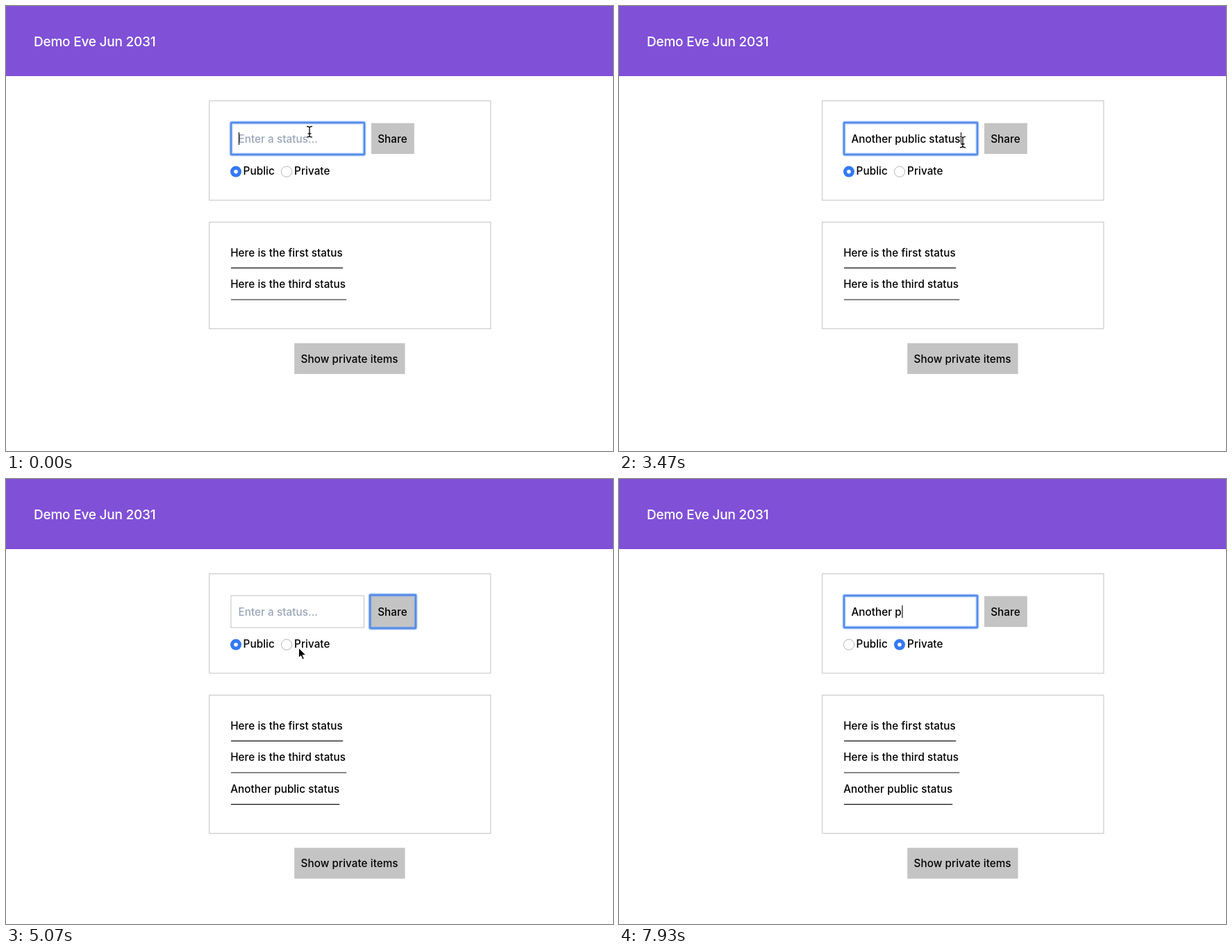
Animation of 874x641 px, one loop 8000 ms. Source, as an HTML page:

```html
<!DOCTYPE html>
<html lang="en">
<head>
<meta charset="utf-8">
<title>Status form</title>
<style>
html, body { margin: 0; width: 100%; height: 100%; overflow: hidden; background: #fff; }
svg { display: block; width: 874px; height: 641px; }
text { font: 450 15.25px Inter, "Noto Sans", sans-serif; letter-spacing: .06px; white-space: pre; }
.title { font-size: 19.06px; letter-spacing: -.25px; fill: #fff; }
.hint { fill: #9aa4b8; }
.frame { fill: #fff; stroke: #c2c2c2; }
.button { fill: #c4c4c4; }
.glow { fill: none; stroke: #5b95f0; stroke-opacity: .45; stroke-width: 5; }
.ring { fill: none; stroke: #5089ea; stroke-width: 2.3; }
.rule { stroke: #111; stroke-width: 1.1; }
</style>
</head>
<body>
<svg viewBox="0 0 874 641">
  <rect width="874" height="101" fill="#8050d7"/>
  <text class="title" x="40" y="57.8">Demo Eve Jun 2031</text>

  <rect class="frame" x="292.7" y="136.6" width="405.2" height="143.2"/>
  <rect class="frame" x="323.9" y="168" width="191.6" height="46"/>
  <g id="fieldFocus">
    <rect class="glow" x="324" y="168" width="192" height="46" rx="1.5"/>
    <rect class="ring" x="324" y="168" width="192" height="46" rx="1"/>
  </g>
  <text id="hint" class="hint" x="334.4" y="196.8">Enter a status...</text>
  <text id="entry" x="334.4" y="196.8"></text>
  <rect id="caret" y="182" width="1.1" height="18"/>

  <rect class="button" x="526" y="168.7" width="61.8" height="44.4"/>
  <g id="shareFocus">
    <rect class="button" x="524" y="167" width="66" height="48"/>
    <rect class="glow" x="524" y="167" width="66" height="48" rx="1.5"/>
    <rect class="ring" x="524" y="167" width="66" height="48" rx="1"/>
  </g>
  <text x="535.2" y="196.8">Share</text>

  <g id="radios"></g>
  <text x="341.6" y="242.9">Public</text>
  <text x="415.1" y="242.9">Private</text>

  <rect id="list" class="frame" x="292.7" y="311.3" width="405.2"/>
  <g id="items"></g>

  <g id="more">
    <rect class="button" x="415.2" y="485.7" width="159.3" height="44.4"/>
    <text x="424.6" y="513.9">Show private items</text>
  </g>

  <g id="pointer" stroke-linejoin="round" stroke-linecap="round">
    <g id="beam" fill="none">
      <path id="beamLine" d="M-3.5-7.5Q0-7.5 0-5.5Q0-7.5 3.5-7.5M0-5.5V5.8M-3.5 7.8Q0 7.8 0 5.8Q0 7.8 3.5 7.8M-2 2.8H2" stroke="#fff" stroke-width="2.6" stroke-opacity=".8"/>
      <path d="M-3.5-7.5Q0-7.5 0-5.5Q0-7.5 3.5-7.5M0-5.5V5.8M-3.5 7.8Q0 7.8 0 5.8Q0 7.8 3.5 7.8M-2 2.8H2" stroke="#000" stroke-width="1.3"/>
    </g>
    <path id="arrow" d="M0 0V14.2L3.2 11.2 5.6 16.4 7.9 15.4 5.6 10.3H10.2Z" fill="#000" stroke="#fff"/>
    <g id="hand" stroke="#000">
      <path d="M-1.4 9.8V1.4Q-1.4 0 0 0T1.4 1.4V5.2Q2.9 4 4.2 5.6Q5.8 4.6 7 6.3Q9.4 5.8 9.6 8.2V11.6L8.4 14.4V16.8H.8V15.2L-4 9.4Q-4.2 7.4-2.4 8.2Z" fill="#fff" stroke-width="1.1"/>
      <path d="M2.2 10V13.6M4.4 10V13.6M6.6 10V13.6" fill="none" stroke-width=".9"/>
    </g>
  </g>
</svg>
<script>
const LOOP = 8000;
const ROW = 45.6;
const PRESS = 4030, SUBMIT = 4100, PICK_PRIVATE = 5830, REFOCUS = 6470;

const el = id => document.getElementById(id);
const show = (id, on) => el(id).setAttribute('display', on ? 'inline' : 'none');
const easeOut = (k, power) => 1 - (1 - k) ** power;

// Bursts of typing: letters appear one by one, `step` ms apart.
const bursts = [
  { at: 670, step: 94, text: 'Another ' },
  { at: 1470, step: 60, text: 'pu' },
  { at: 1670, step: 107, text: 'blic ' },
  { at: 2500, step: 0, text: 's' },
  { at: 2670, step: 80, text: 'tatus' },
  { at: 7030, step: 0, text: 'A' },
  { at: 7330, step: 50, text: 'not' },
  { at: 7570, step: 53, text: 'her ' },
  { at: 7930, step: 0, text: 'p' }
];
const keys = bursts.flatMap(b => [...b.text].map((letter, i) => ({ letter, at: b.at + i * b.step })));

const glides = [
  { from: 30, to: 230, x: 419, y: 183 },
  { from: 3200, to: 4000, x: 554, y: 199 },
  { from: 4570, to: 5330, x: 404, y: 244 },
  { from: 6170, to: 6440, x: 402, y: 199 }
];

function pointerAt(t) {
  let x = 437, y = 181;
  for (const g of glides) {
    const k = Math.min(1, Math.max(0, (t - g.from) / (g.to - g.from)));
    x += (g.x - x) * easeOut(k, 2);
    y += (g.y - y) * easeOut(k, 4);
  }
  return [x, y];
}

function radio(x, on) {
  return on
    ? `<circle cx="${x}" cy="238.6" r="8" fill="#3478f6"/><circle cx="${x}" cy="238.6" r="2.8" fill="#fff"/>`
    : `<circle cx="${x}" cy="238.6" r="7.6" fill="#fff" stroke="#b5b5b5"/>`;
}

const items = [['Here is the first status', 485.2], ['Here is the third status', 490.2], ['Another public status', 480.2]];
el('items').innerHTML = items.map(([text, right], i) =>
  `<g transform="translate(0 ${i * ROW})"><text x="323.2" y="360.6">${text}</text>` +
  `<path class="rule" d="M324 377.4H${right}"/></g>`).join('');
const newest = el('items').lastChild;

function drawField(t) {
  const resetAt = t < SUBMIT ? 0 : SUBMIT;
  const typed = keys.filter(k => k.at >= resetAt && k.at <= t);
  const text = typed.map(k => k.letter).join('');
  const focused = t < PRESS || t >= REFOCUS;
  const since = typed.length ? typed[typed.length - 1].at : t >= REFOCUS ? REFOCUS : 170;
  const lit = t < since || Math.floor((t - since) / 500) % 2 === 0;

  el('entry').textContent = text;
  show('hint', !text);
  show('fieldFocus', focused);
  show('caret', focused && lit);
  el('caret').setAttribute('x', 334.9 + (text ? el('entry').getComputedTextLength() : 0));
}

function drawPointer(t) {
  const [x, y] = pointerAt(t);
  const within = (left, right) => x > left && x < right && y > 168 && y < 214;
  const inField = within(324, 516);
  const onShare = within(526, 588);
  const typing = (t >= 670 && t < 3200) || t >= 7030;
  show('pointer', !typing);
  show('beam', inField);
  show('hand', onShare);
  show('arrow', !inField && !onShare);
  el('pointer').setAttribute('transform', `translate(${x} ${y})`);
}

function draw(t) {
  const added = t >= SUBMIT;
  const isPrivate = t >= PICK_PRIVATE;
  drawField(t);
  show('shareFocus', t >= PRESS && !isPrivate);
  el('radios').innerHTML = radio(331, !isPrivate) + radio(404, isPrivate);
  el('list').setAttribute('height', 153.5 + (added ? ROW : 0));
  newest.setAttribute('display', added ? 'inline' : 'none');
  el('more').setAttribute('transform', `translate(0 ${added ? ROW : 0})`);
  drawPointer(t);
}

const start = performance.now();
function tick() {
  draw((performance.now() - start) % LOOP);
  requestAnimationFrame(tick);
}
tick();
</script>
</body>
</html>
```
